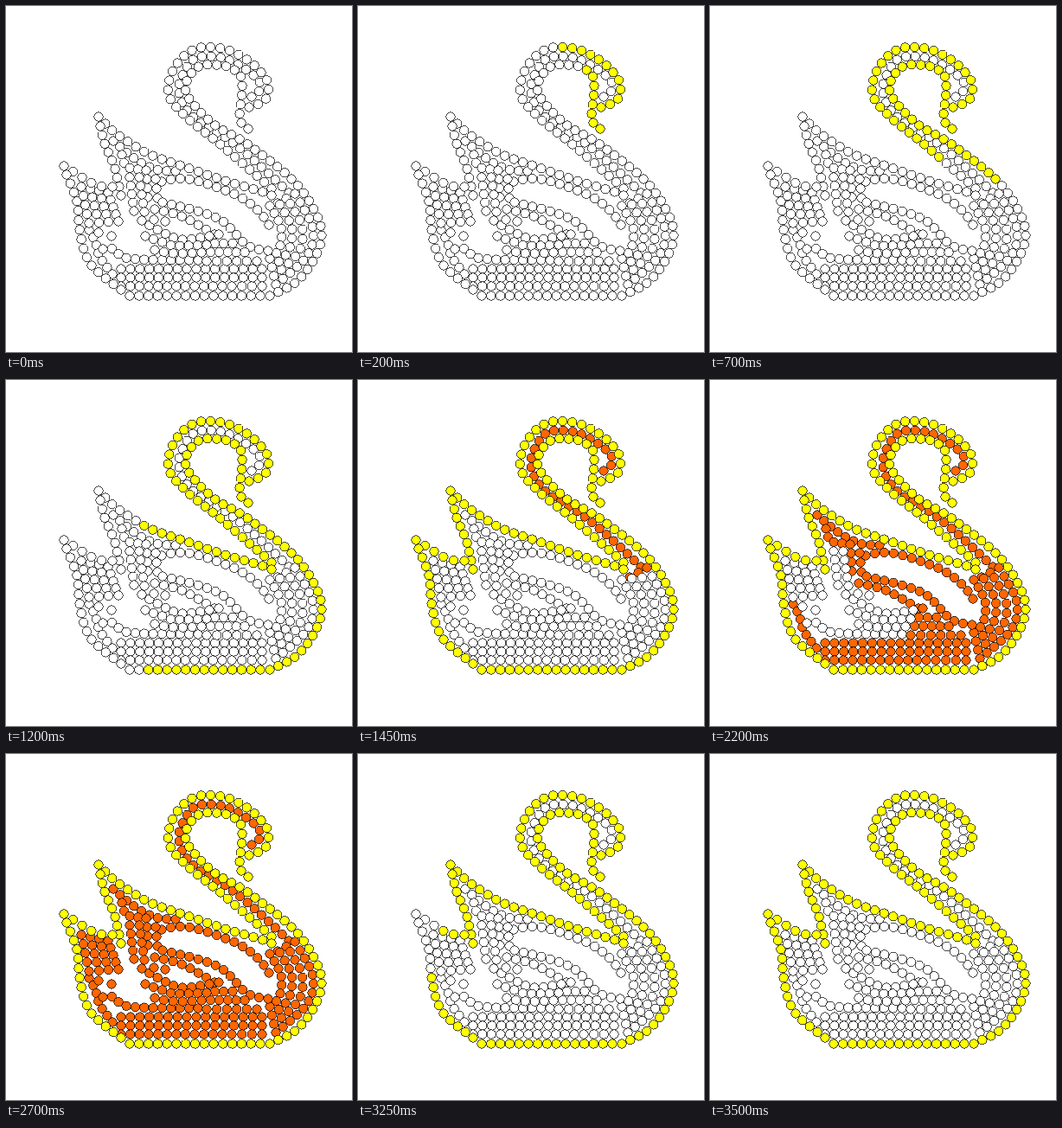
Animation, 400 px wide and 400 px high, one loop 3750 ms. Source, as an HTML page:

```html
<!DOCTYPE html>
<html lang="en">
<head>
<meta charset="utf-8">
<title>Swan lights</title>
<style>
  html, body { margin: 0; width: 100%; height: 100%; overflow: hidden; background: #fff; }
  svg { display: block; width: 100vw; height: 100vh; }
  circle { fill: #fff; stroke: #000; stroke-width: .7; shape-rendering: crispEdges; }
</style>
</head>
<body>
<svg id="stage" viewBox="0 0 400 400"></svg>
<script>
const LOOP = 3750, FIRST = 200, STEP = 250, CLEAR = 3250, TAIL = 3500;
const WHITE = '#ffffff', YELLOW = '#ffff00', ORANGE = '#ff6600';
const GAP = 10.6;
const stage = document.getElementById('stage');
const make = name => document.createElementNS('http://www.w3.org/2000/svg', name);

// Smooth path through x, y, x, y, ... (Catmull-Rom as cubic Beziers)
function smooth(xy) {
  const at = i => {
    const k = 2 * Math.max(0, Math.min(xy.length / 2 - 1, i));
    return [xy[k], xy[k + 1]];
  };
  let d = 'M' + at(0);
  for (let i = 0; i < xy.length / 2 - 1; i++) {
    const [a, b, c, e] = [at(i - 1), at(i), at(i + 1), at(i + 2)];
    d += 'C' + [0, 1].map(j => b[j] + (c[j] - a[j]) / 6)
       + ' ' + [0, 1].map(j => c[j] - (e[j] - b[j]) / 6) + ' ' + c;
  }
  const path = make('path');
  path.setAttribute('d', d);
  return path;
}

// Evenly spaced points on a smooth curve
function curve(xy, count) {
  const path = smooth(xy), len = path.getTotalLength();
  const n = count || Math.round(len / GAP) + 1;
  return Array.from({ length: n }, (_, i) => {
    const p = path.getPointAtLength(n > 1 ? len * i / (n - 1) : 0);
    return [p.x, p.y];
  });
}

function bulb([x, y], ...switches) {
  const c = stage.appendChild(make('circle'));
  c.setAttribute('cx', x);
  c.setAttribute('cy', y);
  c.setAttribute('r', 5.2);
  const steps = [[0, WHITE], ...switches, [LOOP, WHITE]];
  c.animate(
    steps.map(([t, fill]) => ({ fill, offset: t / LOOP, easing: 'steps(1, end)' })),
    { duration: LOOP, iterations: Infinity }
  );
}

// Orange strand, lit at once on the given step
function fill(step, xy, count) {
  for (const p of curve(xy, count)) bulb(p, [FIRST + step * STEP, ORANGE], [CLEAR, WHITE]);
}

// Strands blended between two border curves, one step per strand
function band(steps, from, to) {
  steps.forEach((step, k) => {
    const u = k / (steps.length - 1);
    fill(step, from.map((v, i) => v + (to[i] - v) * u));
  });
}

// Yellow strand, growing bulb by bulb up to each stop
function grow(points, stops) {
  points.forEach((p, i) => {
    const t = FIRST + STEP * stops.filter(s => i >= s).length;
    const tail = p[0] < 90 && p[1] < 250;
    bulb(p, [t, YELLOW], ...(tail ? [[CLEAR, WHITE], [TAIL, YELLOW]] : []));
  });
}

// Neck
fill(5, [284, 105, 293, 98, 293, 88, 277, 73, 249, 60, 218, 61, 201, 88, 203, 109,
  218, 130, 258, 155, 292, 183, 327, 216], 31);
fill(5, [334, 217, 314, 228]);

// Back, wing edge and chest
fill(6, [124, 156, 148, 176, 173, 189, 196, 191]);
fill(7, [180, 203, 211, 200, 263, 217, 291, 236, 304, 253]);
band([6, 7, 7, 8], [340, 227, 355, 258, 348, 289, 312, 322], [305, 231, 318, 256, 316, 280, 305, 292]);

// Hull
fill(8, [133, 304, 296, 304]);
fill(8, [133, 314, 296, 314]);
fill(8, [133, 324, 250, 324]);
fill(7, [261, 324, 296, 324]);
fill(8, [96, 259, 103, 272, 109, 291, 123, 310]);
fill(9, [112, 281, 125, 281, 143, 292, 222, 294]);

// Wing
fill(8, [134, 172, 140, 186, 162, 190]);
band([8, 8, 8], [163, 200, 173, 200], [164, 221, 175, 222]);
fill(8, [181, 227, 244, 245, 278, 276, 303, 283]);
fill(8, [172, 235, 203, 243, 241, 264]);
band([8, 8, 8, 8], [246, 264, 248, 264], [232, 295, 290, 295]);
band([9, 9, 9, 9, 9], [143, 198, 154, 198], [148, 237, 160, 238]);
fill(9, [157, 248, 178, 260, 203, 270, 235, 266]);
fill(9, [161, 266, 178, 272, 195, 277, 232, 276]);
fill(9, [172, 282, 195, 286, 226, 285]);
fill(9, [171, 247, 184, 249]);

// Tail
band([10, 10, 10, 10, 10], [87, 209, 118, 216], [96, 251, 130, 249]);
fill(10, [107, 262, 122, 266]);

// Outline, both ways round from the beak
grow([
  ...curve([281, 117, 300, 108, 302, 87, 280, 63, 249, 49, 218, 50, 195, 71, 188, 102,
    208, 128, 249, 161, 307, 211], 34),
  ...curve([307, 219, 294, 214, 253, 202, 204, 185, 163, 170, 127, 147, 107, 128], 21),
  ...curve([109, 139, 114, 159, 126, 188, 133, 219], 9),
  ...curve([123, 209, 102, 206, 67, 185], 6)
], [12, 19, 29, 39, 49]);
grow([
  [280, 142],
  ...curve([272, 135, 270, 126, 273, 96, 270, 79, 251, 69, 221, 71, 208, 99, 238, 135,
    278, 159, 329, 199, 355, 233, 365, 264, 355, 295, 334, 320, 305, 335], 45),
  ...curve([294, 335, 143, 335], 15),
  ...curve([133, 328, 107, 308, 93, 290, 85, 258, 82, 226, 70, 195], 15)
], [8, 20, 30, 40, 59]);
</script>
</body>
</html>
```
